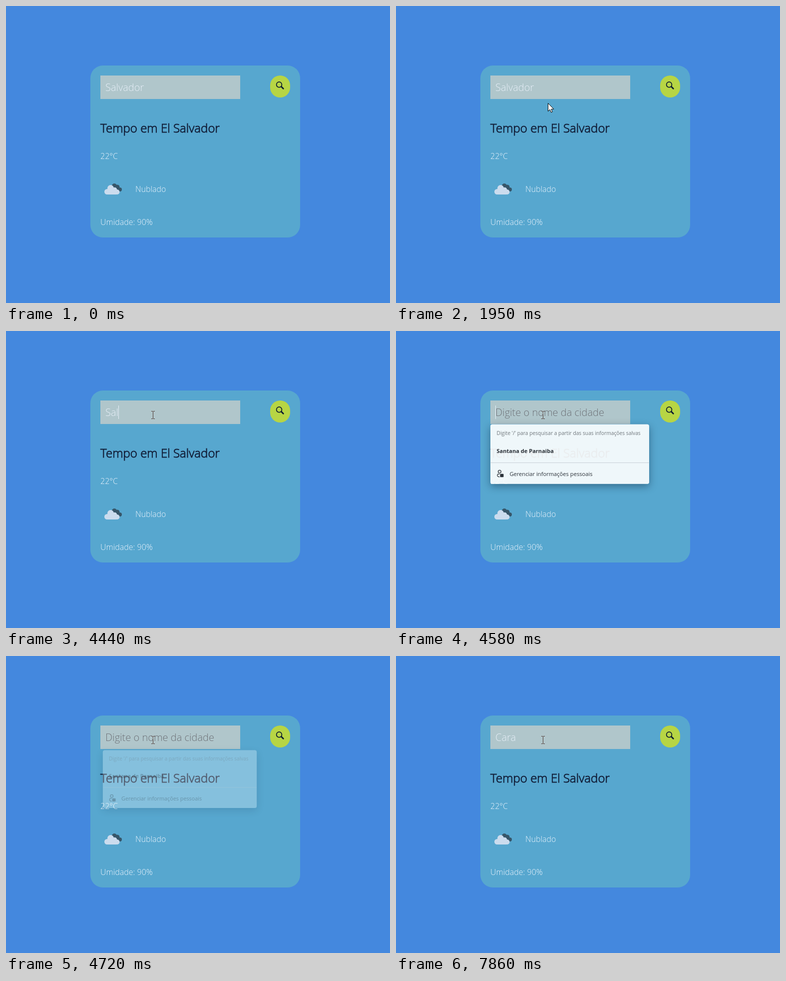
An HTML page with a canvas for the animation above (8000 ms loop, 769 by 594 pixels).

```html
<!DOCTYPE html>
<html lang="pt-BR">
<head>
<meta charset="utf-8">
<title>Tempo</title>
<style>
  html, body { margin: 0; width: 100%; height: 100%; overflow: hidden; background: #4488de; }
  canvas { display: block; }
</style>
</head>
<body>
<canvas id="stage" width="769" height="594"></canvas>
<script>
const ctx = document.getElementById('stage').getContext('2d');
const LOOP = 8000, FRAME = 69;
const FAMILY = '"Open Sans", sans-serif';
const INPUT_FONT = `300 20px ${FAMILY}`;
const BODY_FONT = `300 16px ${FAMILY}`;
const NAVY = '#13213b', PALE = '#eaf3fc';

const OLD_CITY = 'Salvador', NEW_CITY = 'Cara';
const KEY_TIMES = [6540, 6930, 7200, 7330];
const CLICK = 3110, BLINK = 520;
const FIRST_DELETE = 3780, REPEAT_DELETE = 4370;
const POPUP_START = 4580, POPUP_END = 4790;

const clamp = v => Math.min(1, Math.max(0, v));
const mix = (a, b, k) => a + (b - a) * k;
const easeOut = (k, power) => 1 - (1 - k) ** power;

// Progress from 0 to 1, advancing once per frame.
function progress(t, from, to) {
  return clamp(Math.floor((t - from) / FRAME) * FRAME / (to - from));
}

function text(str, x, y, font, color) {
  ctx.font = font;
  ctx.fillStyle = color;
  ctx.fillText(str, x, y);
}

function box(x, y, w, h, r, color) {
  ctx.fillStyle = color;
  ctx.beginPath();
  ctx.roundRect(x, y, w, h, r);
  ctx.fill();
}

function disc(x, y, r, color) {
  ctx.fillStyle = color;
  ctx.beginPath();
  ctx.arc(x, y, r, 0, Math.PI * 2);
  ctx.fill();
}

function ring(x, y, r, width, color) {
  ctx.strokeStyle = color;
  ctx.lineWidth = width;
  ctx.beginPath();
  ctx.arc(x, y, r, 0, Math.PI * 2);
  ctx.stroke();
}

function line(x1, y1, x2, y2, width, color) {
  ctx.strokeStyle = color;
  ctx.lineWidth = width;
  ctx.beginPath();
  ctx.moveTo(x1, y1);
  ctx.lineTo(x2, y2);
  ctx.stroke();
}

function drawSearchButton() {
  const ink = '#0c1a30';
  box(529, 139, 40, 44, 20, '#b7d544');
  ring(547, 157.3, 5.4, 1.7, ink);
  ctx.lineCap = 'round';
  line(551.5, 161.5, 555.3, 165.2, 2.8, ink);
  ctx.lineCap = 'butt';
}

function drawCloud() {
  const dark = '#36566a', light = '#cbdcee';
  disc(217, 360, 5, dark);
  disc(223, 362, 4.5, dark);
  disc(228, 367, 4, dark);
  box(218, 364, 10, 7, 2, dark);
  disc(202.5, 371.5, 5.5, light);
  disc(209.5, 364.5, 6.5, light);
  disc(217.5, 367.5, 4.8, light);
  disc(222.5, 372, 5, light);
  box(202, 366, 20, 11, 2, light);
}

function drawCard() {
  box(169, 119, 420, 344, 25, '#57a7cf');
  box(189, 139, 280, 47, 0, '#b0c6cb');
  drawSearchButton();
  const title = 'Tempo em El Salvador';
  text(title, 189, 252.5, `300 24.1px ${FAMILY}`, NAVY);
  ctx.strokeStyle = NAVY;
  ctx.lineWidth = 0.9;
  ctx.strokeText(title, 189, 252.5);
  text('22°C', 189, 306, BODY_FONT, PALE);
  drawCloud();
  text('Nublado', 259, 372, BODY_FONT, PALE);
  text('Umidade: 90%', 189, 438, BODY_FONT, PALE);
}

// One letter goes first; the held key then removes two per step.
function inputValue(t) {
  const keys = KEY_TIMES.filter(time => time <= t).length;
  if (keys) return NEW_CITY.slice(0, keys);
  const repeats = Math.max(0, Math.floor((t - REPEAT_DELETE) / 70) + 1);
  const removed = (t >= FIRST_DELETE ? 1 : 0) + 2 * repeats;
  return OLD_CITY.slice(0, Math.max(0, OLD_CITY.length - removed));
}

function caretVisible(t) {
  const since = KEY_TIMES.filter(time => time <= t).pop() ?? CLICK;
  return t >= since && Math.floor((t - since) / BLINK) % 2 === 0;
}

function drawInput(t) {
  const value = inputValue(t);
  if (value) text(value, 199, 170, INPUT_FONT, '#e6eef7');
  else text('Digite o nome da cidade', 199, 170, INPUT_FONT, '#6e7278');
  if (caretVisible(t)) {
    ctx.font = INPUT_FONT;
    ctx.fillStyle = '#e6eef7';
    ctx.fillRect(Math.floor(199 + ctx.measureText(value).width), 149, 1, 27);
  }
}

// The shadow lies only around the panel, so it stays clean when translucent.
function drawPanel(x, y, w, h) {
  ctx.save();
  ctx.beginPath();
  ctx.rect(0, 0, 769, 594);
  ctx.roundRect(x, y, w, h, 4);
  ctx.clip('evenodd');
  ctx.shadowColor = 'rgba(0, 20, 40, 0.42)';
  ctx.shadowBlur = 16;
  ctx.shadowOffsetY = 5;
  box(x, y, w, h, 4, '#fbfdfd');
  ctx.restore();
  box(x, y, w, h, 4, '#fbfdfd');
}

function drawSuggestions(t) {
  if (t < POPUP_START || t >= POPUP_END) return;
  const ink = '#1d242b';
  const alpha = mix(0.93, -0.06, progress(t, POPUP_START, POPUP_END));
  const scale = mix(0.953, 1, alpha);
  ctx.save();
  ctx.globalAlpha = alpha;
  ctx.translate(348, 246);
  ctx.scale(scale, scale);
  ctx.translate(-348, -246);
  drawPanel(188.5, 186.5, 319, 119.5);
  text("Digite '/' para pesquisar a partir das suas informações salvas", 201, 208,
    `400 10.3px ${FAMILY}`, '#666d72');
  text('Santana de Parnaiba', 201, 244, `700 11.1px ${FAMILY}`, ink);
  line(189, 263.5, 507, 263.5, 1, '#c3ced4');
  ring(207, 281.3, 2.9, 1.3, ink);
  ctx.beginPath();
  ctx.moveTo(207, 286.5);
  ctx.lineTo(203, 286.5);
  ctx.quadraticCurveTo(201, 291.8, 207, 292);
  ctx.stroke();
  box(208, 286, 7, 6.5, 1, ink);
  text('Gerenciar informações pessoais', 227, 290, `400 11.2px ${FAMILY}`, ink);
  ctx.restore();
}

function drawArrow(x, y) {
  ctx.save();
  ctx.translate(x + 0.5, y + 0.5);
  const arrow = new Path2D('M0 0V16L3.7 12.6L6.2 18.3L8.7 17.2L6.3 11.7H11.4Z');
  ctx.fillStyle = '#fff';
  ctx.fill(arrow);
  ctx.strokeStyle = '#000';
  ctx.lineWidth = 1;
  ctx.stroke(arrow);
  ctx.restore();
}

// The text pointer inverts whatever lies below it.
function drawBeam(x, y) {
  ctx.save();
  ctx.globalCompositeOperation = 'difference';
  ctx.fillStyle = '#fff';
  ctx.fillRect(x, y - 7, 1, 14);
  for (const edge of [y - 8, y + 7]) {
    ctx.fillRect(x - 3, edge, 3, 1);
    ctx.fillRect(x + 1, edge, 3, 1);
  }
  ctx.restore();
}

// Enters from the lower right, then curves up into the input and settles.
function pointerAt(t) {
  if (t < 1400) {
    const k = easeOut(progress(t, 920, 1127), 1.2);
    return [mix(677, 400, k), mix(590, 363, k)];
  }
  const k = easeOut(progress(t, 1400, 2090), 1.65);
  const curve = (a, b, c) => mix(mix(a, b, k), mix(b, c, k), k);
  const settle = 3 * progress(t, 2292, 2430);
  return [curve(398, 326, 294), curve(360, 255, 171) - settle];
}

function drawPointer(t) {
  if (t < 920) return;
  const [x, y] = pointerAt(t).map(Math.round);
  if (y < 186) drawBeam(x, y);
  else drawArrow(x, y);
}

function render(t) {
  ctx.fillStyle = '#4488de';
  ctx.fillRect(0, 0, 769, 594);
  drawCard();
  drawInput(t);
  drawSuggestions(t);
  drawPointer(t);
}

const start = performance.now();
function tick() {
  render((performance.now() - start) % LOOP);
  requestAnimationFrame(tick);
}
tick();
</script>
</body>
</html>
```
